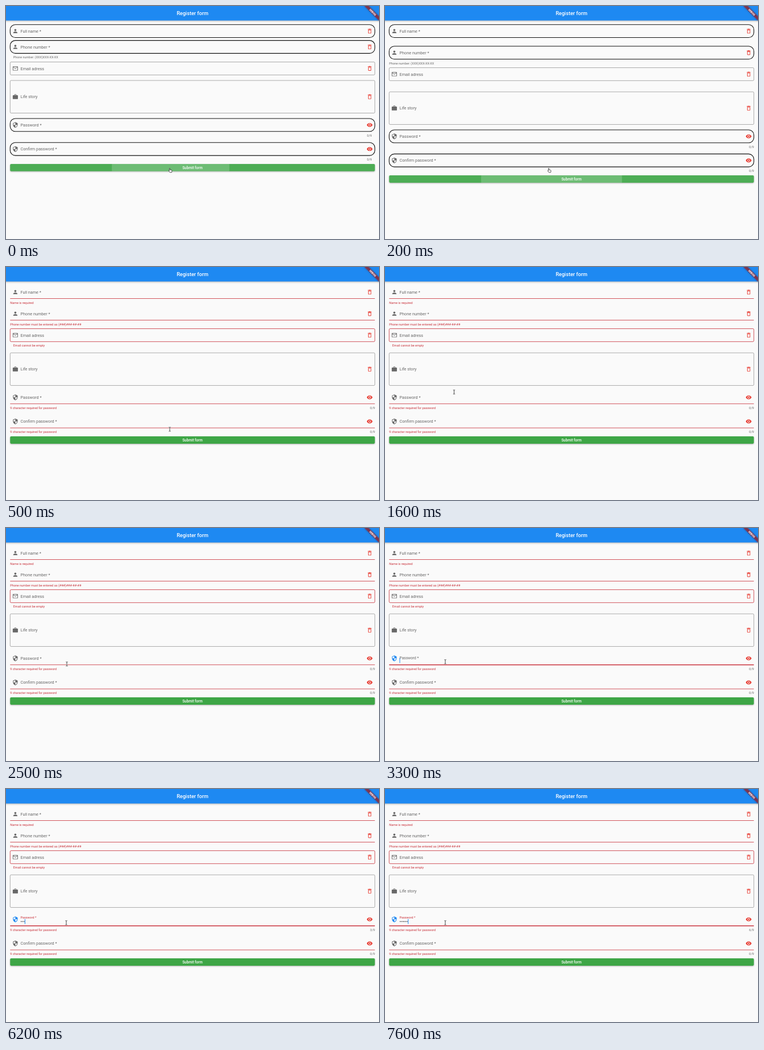
Recreate the animation shown at these times as an HTML page. Size 656 by 410 pixels, loop 8000 ms.

```html
<!DOCTYPE html>
<html lang="en">
<head>
<meta charset="utf-8">
<title>Register form</title>
<style>
  html, body { margin: 0; width: 100%; height: 100%; overflow: hidden; background: #fafafa; }
  #stage { display: block; width: 656px; height: 410px; font-family: Roboto, Arial, sans-serif; }
  .bar { filter: drop-shadow(0 2px 3px rgba(0, 0, 0, .3)); }
  .button { filter: drop-shadow(0 2px 2px rgba(0, 0, 0, .3)); }
  .ribbon { filter: drop-shadow(0 0 3px rgba(0, 0, 0, .5)); }
</style>
</head>
<body>
<svg id="stage" viewBox="0 0 1440 900"></svg>
<script>
const LOOP = 8000, STEP = 100;
const LEFT = 16, RIGHT = 1424, PX = 1440 / 656;
const BLUE = '#1e89f2', RED = '#e73a30', ERROR = '#c8303a', GREY = '#686868';

const ICONS = {
  person: 'M12 12c2.21 0 4-1.79 4-4s-1.79-4-4-4-4 1.79-4 4 1.79 4 4 4zm0 2c-2.67 0-8 1.34-8 4v2h16v-2c0-2.66-5.33-4-8-4z',
  mail: 'M20 4H4c-1.1 0-2 .9-2 2v12c0 1.1.9 2 2 2h16c1.1 0 2-.9 2-2V6c0-1.1-.9-2-2-2zm0 14H4V8l8 5 8-5v10zm-8-7L4 6h16l-8 5z',
  work: 'M20 6h-4V4c0-1.1-.9-2-2-2h-4c-1.1 0-2 .9-2 2v2H4c-1.1 0-2 .9-2 2v11c0 1.1.9 2 2 2h16c1.1 0 2-.9 2-2V8c0-1.1-.9-2-2-2zm-6 0h-4V4h4v2z',
  shield: 'M12 1L3 5v6c0 5.55 3.84 10.74 9 12 5.16-1.26 9-6.45 9-12V5l-9-4zm0 11h7c-.53 4.12-3.28 7.79-7 8.94V12H5V6.3l7-3.11V12z',
  trash: 'M6 19c0 1.1.9 2 2 2h8c1.1 0 2-.9 2-2V7H6v12zM8 9h8v10H8V9zm7.5-5l-1-1h-5l-1 1H5v2h14V4h-3.5z',
  eye: 'M12 4.5C7 4.5 2.73 7.61 1 12c1.73 4.39 6 7.5 11 7.5s9.27-3.11 11-7.5c-1.73-4.39-6-7.5-11-7.5zM12 17c-2.76 0-5-2.24-5-5s2.24-5 5-5 5 2.24 5 5-2.24 5-5 5zm0-8c-1.66 0-3 1.34-3 3s1.34 3 3 3 3-1.34 3-3-1.34-3-3-3z'
};

// y: centre before validation; shift: how far the error lines push it down
const FIELDS = [
  { label: 'Full name *', y: 97, shift: 0, icon: 'person', required: true, error: 'Name is required' },
  { label: 'Phone number *', y: 158, shift: 22.3, icon: 'person', required: true,
    helper: 'Phone number: (XXX)XXX-XX-XX', error: 'Phone number must be entered as (###)###-##-##' },
  { label: 'Email adress', y: 241.3, shift: 22, icon: 'mail', error: 'Email cannot be empty' },
  { label: 'Life story', y: 350.6, shift: 44, icon: 'work', height: 126 },
  { label: 'Password *', y: 459.5, shift: 44, icon: 'shield', required: true, secret: true,
    focusable: true, error: '9 character required for password' },
  { label: 'Confirm password *', y: 552.5, shift: 44, icon: 'shield', required: true, secret: true,
    error: '9 character required for password' }
];

const TYPED_AT = [5000, 5600, 6200, 6700, 7100, 7600];
const MOUSE = [[0, 288, 285.5], [900, 288, 285.5], [1400, 46, 141], [1800, 197, 299],
  [1900, 191, 306], [2500, 107, 239.3], [2700, 106, 235.8], [2900, 106, 235.3], [LOOP, 106, 235.3]];

const clamp = v => Math.min(1, Math.max(0, v));
const smooth = v => (v = clamp(v), v * v * (3 - 2 * v));
const mix = (a, b, p) => a + (b - a) * p;

function text(str, x, y, size, fill, extra = '') {
  return `<text x="${x}" y="${y + size * .36}" font-size="${size}" fill="${fill}" ${extra}>${str}</text>`;
}

function icon(name, x, y, fill) {
  return `<path transform="translate(${x - 12} ${y - 12})" fill="${fill}" fill-rule="evenodd" d="${ICONS[name]}"/>`;
}

function outline(top, height, radius, color, width) {
  return `<rect x="${LEFT}" y="${top}" width="${RIGHT - LEFT}" height="${height}" rx="${radius}"
    fill="none" stroke="${color}" stroke-width="${width}"/>`;
}

function caretOpacity(t) {
  if (t < 3300) return 0;
  if (t >= 5000) return 1;
  if (t < 4500) return clamp((4100 - t) / 200 + (t < 4000 ? 1 : 0));
  return t < 4900 ? clamp((t - 4400) / 200) : .5;
}

function drawField(f, t) {
  const y = f.y + (t >= 200 ? f.shift : 0), height = f.height || 50;
  const top = y - height / 2, bottom = y + height / 2;
  const invalid = f.error && t >= 300;
  const focus = f.focusable ? smooth((t - 3220) / 200) : 0;
  const count = f.focusable ? TYPED_AT.filter(at => t >= at).length : 0;
  const inset = t < 200 ? 12 : 0;

  let out = '';
  if (!f.required) out += outline(top, height, 4, invalid ? ERROR : '#858585', invalid ? 1.8 : 1.5);
  else if (!invalid) out += outline(top, height, 20, '#111', 2.4);
  else {
    const width = focus ? 3.2 : 1.8;
    out += `<rect x="${LEFT}" y="${bottom - width / 2}" width="${RIGHT - LEFT}" height="${width}" fill="${ERROR}"/>`;
  }

  out += icon(f.icon, 36, y, focus ? BLUE : GREY);
  out += icon(f.secret ? 'eye' : 'trash', 1404, y, RED);
  out += text(f.label, 56, mix(y, y - 7.5, focus), mix(16, 12, focus), focus > .6 ? ERROR : GREY);

  if (invalid) {
    out += text(f.error, f.required ? LEFT : LEFT + 12, bottom + 15.5, 12, ERROR, `opacity="${clamp((t - 200) / 167)}"`);
  } else if (f.helper) {
    out += text(f.helper, LEFT + inset, bottom + 15.5, 12, GREY);
  }
  if (f.secret) out += text(count + '/9', RIGHT - inset, bottom + 15.5, 12, GREY, 'text-anchor="end"');
  if (f.focusable) {
    out += text('•'.repeat(count), 56, y + 8.3, 16, '#222');
    out += `<rect x="${56 + 5.4 * count}" y="${y - 1}" width="2.2" height="19" fill="${BLUE}" opacity="${caretOpacity(t)}"/>`;
  }
  return out;
}

function drawButton(t) {
  const top = t < 200 ? 610 : 654, width = RIGHT - LEFT;
  const hover = .08 * clamp((400 - t) / 100);
  const ripple = .18 * clamp((500 - t) / 300);
  const white = `fill="#fff" fill-opacity=`;
  return `<rect class="button" x="${LEFT}" y="${top}" width="${width}" height="28.5" rx="4" fill="#3ea646"/>
    <svg x="${LEFT}" y="${top}" width="${width}" height="28.5">
      <rect width="${width}" height="28.5" rx="4" ${white}"${hover}"/>
      <circle cx="${619.5 + t * .0375}" cy="14" r="${227 + t * .225}" ${white}"${ripple}"/>
    </svg>` + text('Submit form', 720, top + 14.3, 14, '#fff', 'text-anchor="middle" font-weight="500"');
}

function drawMouse(t) {
  const i = MOUSE.findIndex(k => k[0] > t), [t0, x0, y0] = MOUSE[i - 1], [t1, x1, y1] = MOUSE[i];
  const p = smooth((t - t0) / (t1 - t0));
  const place = `transform="scale(${PX}) translate(${mix(x0, x1, p)} ${mix(y0, y1, p)})"`;
  if (t < 400) {
    return `<path ${place} d="M0 0q.7 0 .7.7V2.8l2.5.6q.9.3.8 1.2L3.4 7.3H.2L-1.9 4.5q.3-.8 1.2-.1V.7Q-.7 0 0 0z"
      fill="#fff" stroke="#333" stroke-width=".8" stroke-linejoin="round"/>`;
  }
  const beam = 'M-1.6-3.7Q0-3.7 0-2.8Q0-3.7 1.6-3.7M0-2.8V2.8M-1.6 3.7Q0 3.7 0 2.8Q0 3.7 1.6 3.7';
  return `<g ${place} fill="none"><path d="${beam}" stroke="#fff" stroke-width="1.6"/>
    <path d="${beam}" stroke="#333" stroke-width=".9"/></g>`;
}

const HEADER = `<rect width="1440" height="900" fill="#fafafa"/>
  <rect class="bar" x="-10" y="-10" width="1460" height="66" fill="${BLUE}"/>` +
  text('Register form', 720, 28.3, 20, '#fff', 'text-anchor="middle" font-weight="500"') +
  `<g transform="translate(1440 0) rotate(45)">
    <rect class="ribbon" x="-40" y="28" width="80" height="12" fill="#b71c1c" fill-opacity=".63"/>` +
  text('DEBUG', 0, 34, 10.2, '#fff', 'text-anchor="middle" font-weight="900"') + '</g>';

const stage = document.getElementById('stage');
let shown = -1;

function tick(now) {
  const t = Math.floor(now % LOOP / STEP) * STEP;
  if (t !== shown) {
    shown = t;
    stage.innerHTML = HEADER + FIELDS.map(f => drawField(f, t)).join('') + drawButton(t) + drawMouse(t);
  }
  requestAnimationFrame(tick);
}
tick(0);
</script>
</body>
</html>
```
